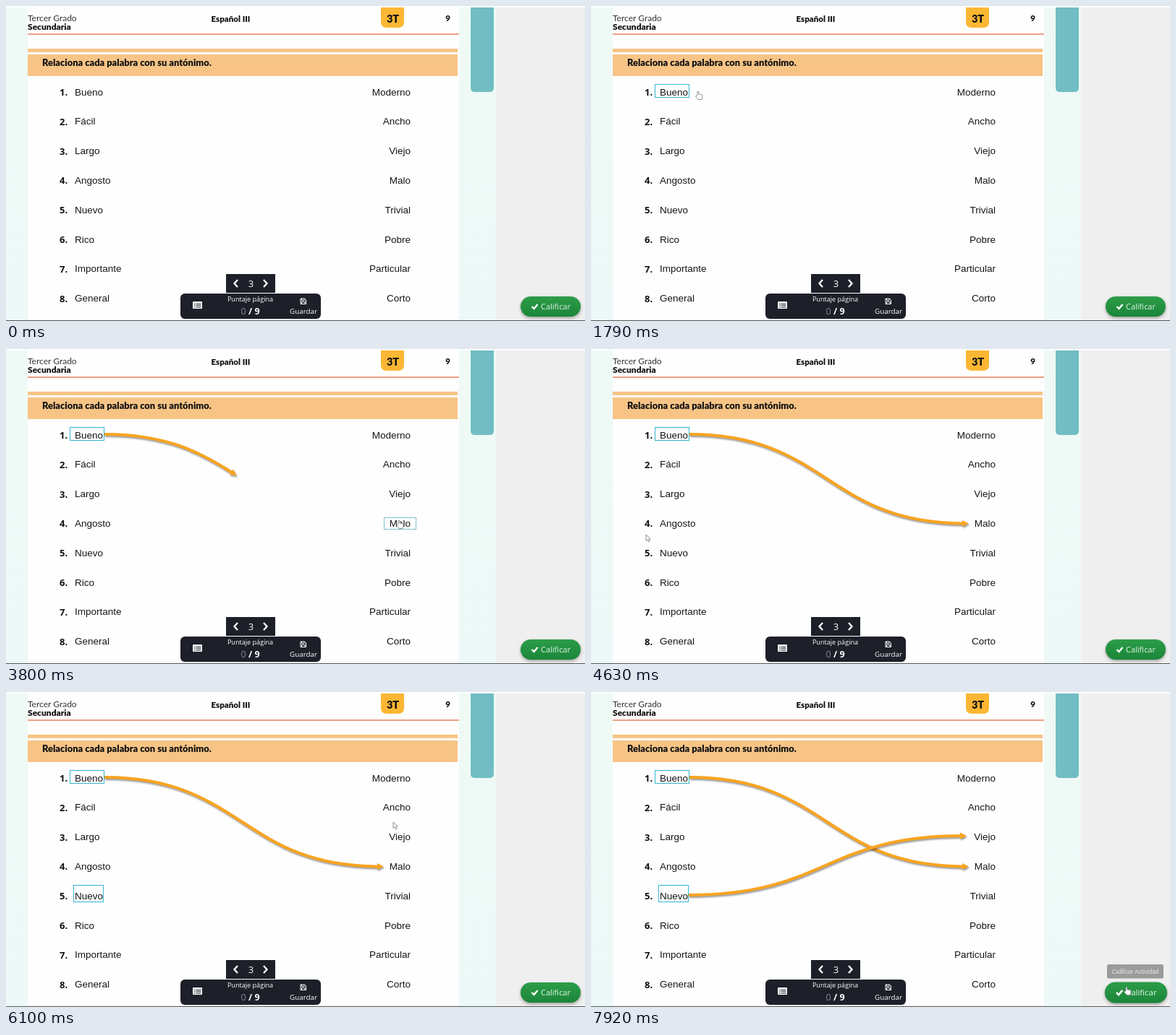
Animation, 800 px wide and 436 px high, one loop 8000 ms. Source, as an HTML page:

```html
<!DOCTYPE html>
<html lang="es">
<head>
<meta charset="utf-8">
<style>
  html, body { margin: 0; width: 100%; height: 100%; overflow: hidden; background: #fff; }
  svg { display: block; width: 800px; height: 436px; }
  .lato { font-family: Lato, sans-serif; font-weight: 900; fill: #111; }
  .open { font-family: "Open Sans", sans-serif; fill: #fff; }
  .word { font: 13.5px "Liberation Sans", Arial, sans-serif; fill: #161616; }
  .number { font: 700 13px "Open Sans", sans-serif; fill: #111; }
  .mid { text-anchor: middle; }
  .end { text-anchor: end; }
  .line { fill: none; stroke: #5a4a3a; }
  .link { fill: none; stroke: #f8a420; stroke-width: 4; }
  .shadow { filter: drop-shadow(1px 2px 1px #0006); }
</style>
</head>
<body>
<svg id="stage" viewBox="0 0 800 436">
  <defs>
    <linearGradient id="mint" x2="0" y2="1">
      <stop stop-color="#effaf5"/><stop offset="1" stop-color="#ecf9f8"/>
    </linearGradient>
    <linearGradient id="green" x2="0" y2="1">
      <stop stop-color="#2c9d48"/><stop offset="1" stop-color="#1b8639"/>
    </linearGradient>
  </defs>

  <rect y="2" width="677" height="434" fill="url(#mint)"/>
  <rect x="677" y="2" width="123" height="434" fill="#f0eff0"/>
  <rect x="30" y="2" width="596" height="434" fill="#fefefe"/>
  <path d="M642 2h32v111q0 6-6 6h-20q-6 0-6-6z" fill="#72bdc4"/>
  <path d="M518 2h32v20q0 8-8 8h-16q-8 0-8-8z" fill="#fbb733"/>
  <path d="M30 39H626" stroke="#f0a087" stroke-width="2"/>
  <path d="M30 59h594v5H30zM30 67h594v30H30z" fill="#f7c486"/>

  <text class="lato" x="30" y="20.5" font-size="12" style="font-weight:400;fill:#333">Tercer Grado</text>
  <text class="lato" x="30" y="33" font-size="12">Secundaria</text>
  <text class="lato mid" x="310.5" y="22" font-size="11.5">Español III</text>
  <text class="lato mid" x="534.5" y="23" font-size="14.5">3T</text>
  <text class="lato mid" x="610.5" y="21" font-size="11.5">9</text>
  <text class="lato" x="50" y="83" font-size="12.9">Relaciona cada palabra con su antónimo.</text>

  <g id="words"></g>
  <g id="boxes"></g>
  <g id="links"></g>

  <g fill="#1d2029">
    <rect x="304" y="371" width="68" height="26"/>
    <rect x="241" y="398" width="194" height="35" rx="6"/>
  </g>
  <path d="M320 379l-4.5 5 4.5 5M356 379l4.5 5-4.5 5" fill="none" stroke="#fff" stroke-width="2.3"/>
  <g class="open">
    <text class="mid" x="338.5" y="388.5" font-size="13">3</text>
    <text class="mid" x="337.5" y="408.5" font-size="9.1">Puntaje página</text>
    <text x="324.5" y="426.5" font-size="12.5" fill="#858890">0</text>
    <text x="335" y="426.5" font-size="12.5" font-weight="700">/ 9</text>
    <text class="mid" x="411" y="426" font-size="9.8">Guardar</text>
  </g>
  <rect x="258" y="409" width="13" height="10" rx="1" fill="#fff"/>
  <path d="M260 412.5h1.5m1 0h7M260 414.7h1.5m1 0h7M260 417h1.5m1 0h7" stroke="#1d2029"/>
  <path d="M407 405h5.5l2 2v5.500h-7.500zM408.500 405v2.500h3.500V405M408.500 412.500v-3h4.500v3" fill="none" stroke="#fff"/>

  <g id="button">
    <rect x="711" y="402" width="83" height="28" rx="14" fill="url(#green)" style="filter:drop-shadow(0 2px 2px #0005)"/>
    <path d="M726.500 416l3 3 5-6" fill="none" stroke="#fff" stroke-width="2.4"/>
    <text class="open" x="739" y="420" font-size="11" style="fill:#e4f3e7">Calificar</text>
  </g>
  <g id="tooltip">
    <rect x="713" y="377" width="78" height="19.500" rx="2" fill="#9b9b9b"/>
    <text class="mid" x="752" y="389.500" font-size="8.2" font-family="Liberation Sans, Arial, sans-serif" fill="#e8e8e8">Calificar Actividad</text>
  </g>

  <path d="M0 435.500H800" stroke="#555"/>

  <g id="cursor" stroke="#777" stroke-width=".8" fill="#fff" stroke-linejoin="round">
    <path id="arrow" d="M0 0v8.500l2-1.800 1.500 3.200 1.500-.7-1.400-3.100h2.700z"/>
    <path id="hand" d="M-1 5.500V.8q1-1.200 2 0v3.500q1.200-.8 1.800.2 1.200-.6 1.700.4 1.300-.3 1.500.8v2.800l-1 3H.2L-3.300 7.300q-.2-1.600 1.300-1z"/>
  </g>
</svg>

<script>
const LOOP = 8000;
const $ = id => document.getElementById(id);

function add(parent, tag, attrs, text = "") {
  const el = document.createElementNS("http://www.w3.org/2000/svg", tag);
  for (const key in attrs) el.setAttribute(key, attrs[key]);
  el.textContent = text;
  parent.append(el);
  return el;
}
const show = (el, on) => el.style.display = on ? "" : "none";
const clamp = v => Math.max(0, Math.min(1, v));
const ease = v => v * v * (3 - 2 * v);

const left = ["Bueno", "Fácil", "Largo", "Angosto", "Nuevo", "Rico", "Importante", "General"];
const right = ["Moderno", "Ancho", "Viejo", "Malo", "Trivial", "Pobre", "Particular", "Corto"];
left.forEach((word, i) => {
  const y = 123.5 + 40.8 * i;
  add($("words"), "text", { class: "number", x: 74, y: y + .5 }, `${i + 1}.`);
  add($("words"), "text", { class: "word", x: 95, y }, word);
  add($("words"), "text", { class: "word end", x: 559, y }, right[i]);
});

// Answer areas; "picked" is when a box stays lit for good.
const boxes = [
  { x: 88.5, y: 108.5, w: 47, h: 18, picked: 1440 },
  { x: 93.5, y: 267.5, w: 41, h: 23, picked: 5320 },
  { x: 522.5, y: 233.5, w: 44, h: 16, picked: Infinity },
  { x: 520.5, y: 186.5, w: 46, h: 23, picked: Infinity },
];
for (const b of boxes)
  b.el = add($("boxes"), "rect", { x: b.x, y: b.y, width: b.w, height: b.h, fill: "none" });

function makeLink(x1, y1, x2, y2, start) {
  const mid = (x1 + x2) / 2;
  const group = add($("links"), "g", { class: "shadow" });
  const path = add(group, "path", { class: "link", d: `M${x1} ${y1}C${mid} ${y1} ${mid} ${y2} ${x2} ${y2}` });
  const head = add(group, "path", { d: "M-3-4.500L6 0L-3 4.500z", fill: "#f8a420" });
  return { group, path, head, start, length: path.getTotalLength() };
}
const links = [
  makeLink(136, 118, 516, 241.5, 3640),
  makeLink(135, 281, 513, 199, 6530),
];

// Pointer stops: time, x, y.
const route = [
  [360, 290, 440], [1130, 120, 118], [1700, 120, 118], [1790, 148, 118],
  [2530, 539, 236], [2750, 543, 237], [4050, 543, 237], [4600, 76, 257],
  [4650, 76, 257], [5150, 114, 279], [5500, 114, 279], [6100, 535, 180],
  [6300, 543, 196], [7130, 543, 196], [7720, 740, 408],
];

function pointerAt(t) {
  const next = route.findIndex(stop => stop[0] > t);
  if (next < 0) return route.at(-1).slice(1);
  if (next === 0) return route[0].slice(1);
  const [t0, x0, y0] = route[next - 1], [t1, x1, y1] = route[next];
  const k = ease((t - t0) / (t1 - t0));
  return [x0 + (x1 - x0) * k, y0 + (y1 - y0) * k];
}

const inside = (b, x, y, pad = 0) =>
  x > b.x - pad && x < b.x + b.w + pad && y > b.y && y < b.y + b.h;

function drawLink({ group, path, head, start, length }, t) {
  show(group, t >= start);
  const reach = length * ease(clamp((t - start + 20) / 380));
  path.style.strokeDasharray = `${reach} ${length + 10}`;
  const tip = path.getPointAtLength(reach);
  const back = path.getPointAtLength(Math.max(0, reach - 2));
  const angle = Math.atan2(tip.y - back.y, tip.x - back.x) * 180 / Math.PI;
  head.setAttribute("transform", `translate(${tip.x} ${tip.y}) rotate(${angle})`);
}

function draw(t) {
  const [x, y] = pointerAt(t);
  const onButton = inside({ x: 711, y: 402, w: 83, h: 28 }, x, y);
  const onWord = boxes.some(b => inside(b, x, y, 14));

  for (const b of boxes) {
    const picked = t >= b.picked;
    show(b.el, picked || inside(b, x, y));
    b.el.setAttribute("stroke", picked ? "#35b5cf" : "#7cc6d0");
  }
  links.forEach(link => drawLink(link, t));

  $("button").setAttribute("transform", onButton ? "translate(753 416) scale(1.04) translate(-752.500 -416)" : "");
  show($("tooltip"), t >= 7900);

  show($("cursor"), t >= 360);
  $("cursor").setAttribute("transform", `translate(${x} ${y})`);
  show($("hand"), onWord || onButton);
  show($("arrow"), !onWord && !onButton);
}

const begin = performance.now();
function tick() {
  draw((performance.now() - begin) % LOOP);
  requestAnimationFrame(tick);
}
tick();
</script>
</body>
</html>
```
